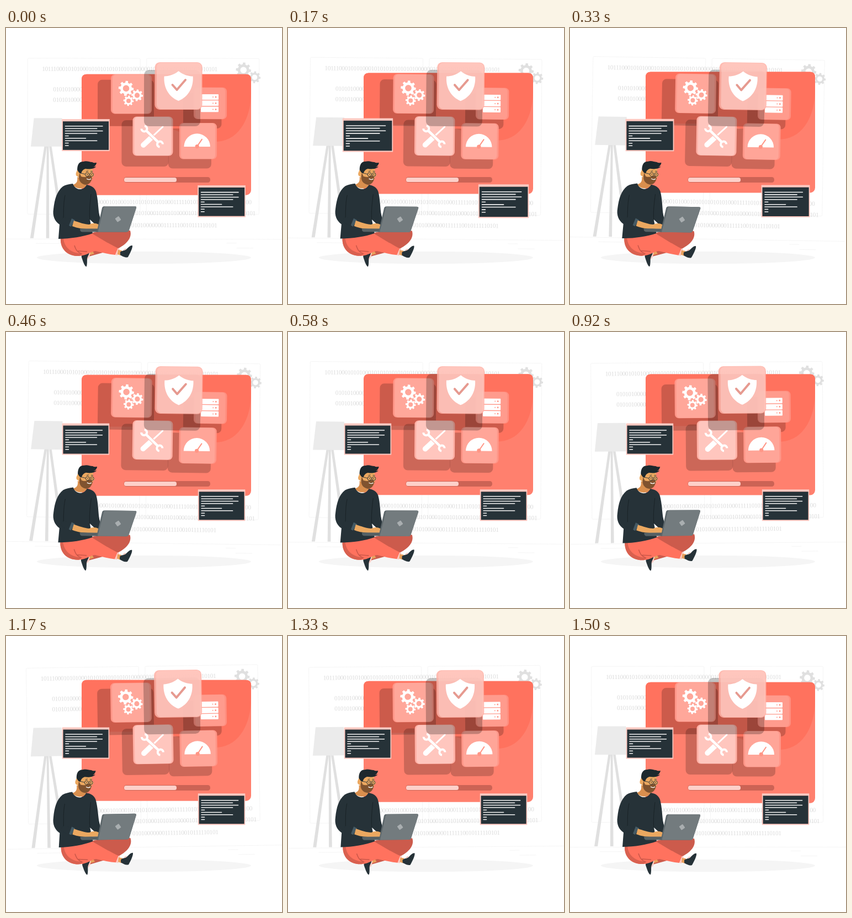
An HTML page for the animation above (1.54 s loop, 500x500 px).

```html
<!DOCTYPE html>
<html lang="en">
<head>
<meta charset="utf-8">
<title>System care</title>
<style>
html, body { margin: 0; width: 100%; height: 100%; overflow: hidden; background: #fff; }
svg { display: block; width: 100vw; height: 100vh; }
.code { font: 11.5px "Liberation Serif", serif; letter-spacing: -.44px; fill: #dcdcdc; }
</style>
</head>
<body>
<svg viewBox="0 0 500 500" xmlns="http://www.w3.org/2000/svg">
  <g id="back">
    <path d="M0 382.5H500M400 389.5H418M418 398.500H448M54 390.500H98" stroke="#f1f1f1" stroke-width=".7"/>
    <g fill="none" stroke="#f3f3f3" stroke-width=".8">
      <rect x="39" y="55" width="204" height="282.500" rx="2"/>
      <rect x="254.500" y="55" width="204" height="282.500" rx="2"/>
    </g>
    <g id="code" class="code"></g>
    <path id="backGears" fill="#e0e0e0" fill-rule="evenodd"/>
    <path d="M69.500 214L44 381H50L74 214ZM73.800 214L72.800 381H78.500L77.500 214ZM78 214L102 381H108L82.500 214Z" fill="#e0e0e0"/>
    <path d="M50.500 163.500H101.500L107 215H45Z" fill="#ebebeb"/>
  </g>
  <ellipse cx="250" cy="416" rx="194" ry="11.300" fill="#f5f5f5"/>

  <g id="panel">
    <rect x="137" y="84" width="307" height="219" rx="9" fill="#ff806e"/>
    <path d="M137 93Q137 84 146 84H435Q444 84 444 93V118C444 160 424 203 384 206C340 208 320 181 270 179C220 177 190 178 137 178Z" fill="#ff725e"/>
  </g>
  <rect x="213.500" y="270" width="156.500" height="10" rx="4.500" fill="#cc6355"/>
  <rect x="214" y="271" width="95" height="8" rx="3.500" fill="#ffd0c9"/>

  <g id="tiles">
    <g id="cards"></g>
    <path id="tileGears" fill="#fff" fill-rule="evenodd"/>
    <g id="servers"></g>
    <g fill="none" stroke="#fff">
      <path d="M284 179L267 195" stroke-width="3" stroke-linecap="round"/>
      <path d="M264.500 197.500L249 212" stroke-width="9.500" stroke-linecap="round"/>
      <path d="M253 185L277 208" stroke="#ffc4bc" stroke-width="7"/>
      <path d="M253 185L277 208" stroke-width="4.600"/>
      <path d="M251 177.500A5 5 0 1 1 245.500 182.500M278.500 215.500A5 5 0 1 1 284 210.500" stroke-width="4"/>
    </g>
    <path d="M322.500 215A23.700 23.700 0 0 1 370 215Z" fill="#fff"/>
    <path d="M346.500 214L355 201.500" stroke="#ff9686" stroke-width="2" stroke-linecap="round"/>
    <circle cx="346.300" cy="214.500" r="3.600" fill="#ff9686"/>
    <rect x="250" y="76" width="102" height="102" rx="9" fill="#000" opacity=".24"/>
    <rect x="269.500" y="62" width="86" height="86" rx="9" fill="#ffb1a6" opacity=".86"/>
    <rect x="273" y="63" width="81" height="84" rx="8" fill="#ffcdc6" opacity=".62"/>
    <path d="M312.500 78C304 85 294 87.500 286.500 87.500C285 108 295 125 312.500 132C330 125 340 108 338.500 87.500C331 87.500 321 85 312.500 78Z" fill="#fff"/>
    <path d="M301.500 103L309.500 112L325 94" fill="none" stroke="#e69a90" stroke-width="4" stroke-linecap="round" stroke-linejoin="round"/>
  </g>

  <g id="term1"></g>
  <g id="term2"></g>

  <g id="man">
    <path d="M138 377C165 366 200 363 225 367C229 380 219 391 204 399L150 414L132 412L150 396Z" fill="#cc5b4c"/>
    <path d="M148 406L157 404L160 409L150 412Z" fill="#e8a05c"/>
    <path d="M148 404L153 405L151 416L147 420Z" fill="#ffd0c9"/>
    <path d="M137 409C141 405 148 404 151 406C151 411 147 414 147 420C147 426 147 431 145.500 432.500C142 431 139 421 137 415Z" fill="#263238"/>
    <path d="M99 380C98 401 112 414 133 413C148 412 152 405 162 404C175 407 187 410 198 411L203 399C185 390 168 379 157 372Z" fill="#ff725e"/>
    <path d="M99 381C98 401 112 414 133 413L139 409C119 408 106 399 104 381Z" fill="#d9604f"/>
    <path d="M124 394C127 403 130 407 137 409M130 404L147 405" fill="none" stroke="#c95749" stroke-width="1.500"/>
    <path d="M157 373C175 369 199 366 222 366C218 381 201 388 184 389Z" fill="#cc5b4c"/>
    <path d="M198 411L203 398.500L206 400L202 412Z" fill="#ffc7be"/>
    <path d="M203 402L210 403L208 412L202 410Z" fill="#e8a05c"/>
    <path d="M207 406C210 403 214 404 218 401C222 397 226 393 229 394C230 398 225 408 221 415C217 417 210 413 207 411Z" fill="#263238"/>
    <path d="M212 402L217 399L218 401L214 403Z" fill="#ffc7be"/>

    <path d="M129 270L147 276L146 284C141 294 126 292 121 284C128 282 130 278 129 270Z" fill="#d98f4e"/>
    <path d="M121 282C125 294 140 296 146 284C153 285 160 288 163 296C167 310 167 329 169 338L173 354L164 358L152 347L157 372C140 378 117 382 95 382L97 356C88 350 84 340 86 328C88 310 92 296 103 287C108 284 114 283 121 282Z" fill="#263238"/>
    <path d="M107 303C103 320 105 336 104 345L119 351M154 301C152 319 150 333 152 347" fill="none" stroke="#1a2327" stroke-width="1"/>
    <path d="M98 349C104 355 111 359 118 360L123 348L105 343Z" fill="#263238"/>
    <path d="M118 360L114 358L119 345L125 348Z" fill="#455a64"/>
    <path d="M123 349C132 352 143 356 151 356C156 353 164 353 169 357L166 364H149C139 364 130 363 120 359Z" fill="#eba860"/>

    <path d="M131 255C126 259 126 268 132 271C133 280 139 284 146 283C153 281 156 274 157 269L160 267L157 262L156 252L143 249Z" fill="#eba860"/>
    <path d="M133 262L136 269C141 271 146 270 149 268C153 267 155 269 156 272C154 280 150 284 144 284C137 283 132 278 132 270Z" fill="#80532f"/>
    <path d="M146 273C149 275 152 275 154 273" fill="none" stroke="#fff" stroke-width="1.300"/>
    <path d="M129 257C129 248 132 242 140 242C146 240 151 243 156 243C159 245 162 244 164 244C163 249 160 252 156 252L163 251C159 256 150 256 144 255C140 256 137 259 136 264L132 262Z" fill="#1d282d"/>
    <ellipse cx="129.500" cy="264.500" rx="3" ry="4" fill="#eba860"/>
    <g fill="none" stroke="#263238" stroke-width=".9">
      <circle cx="147" cy="265.500" r="3.500"/><circle cx="155" cy="265.500" r="3.300"/>
      <path d="M143.500 265L136 263M145 260L149 259M153 259.500L157 260"/>
    </g>
    <path d="M146.500 265.500h1.500M154 265.500h1.500" stroke="#263238" stroke-width="1.400"/>

    <path d="M135 363.500H168V369.500H138Q134 369 134 364Z" fill="#566165"/>
    <path d="M178 323H233Q237 323 236 326L223 366Q222 369.500 218 369.500H164.500L174 326Q175 323 178 323Z" fill="#5d676b"/>
    <path d="M180 323H233Q237 323 236 326L223 366Q222 369.500 218 369.500H166.500L177 326Q178 323 180 323Z" fill="#737b7e"/>
    <rect x="199" y="342.300" width="8" height="8" rx="1" transform="rotate(-35 203 346.300)" fill="#a9aeb0"/>
  </g>
</svg>
<script>
const $ = id => document.getElementById(id);
const rect = (x, y, w, h, r, fill, opacity = 1) =>
  `<rect x="${x}" y="${y}" width="${w}" height="${h}" rx="${r}" fill="${fill}" opacity="${opacity}"/>`;

function gear(cx, cy, r, hole, teeth = 8) {
  const step = Math.PI * 2 / teeth, pts = [];
  for (let i = 0; i < teeth; i++) {
    [[-.3, .76], [-.2, 1], [.2, 1], [.3, .76]].forEach(([a, k]) => {
      const ang = (i + a) * step + .1;
      pts.push((cx + r * k * Math.cos(ang)).toFixed(2) + ' ' + (cy + r * k * Math.sin(ang)).toFixed(2));
    });
  }
  return `M${pts.join('L')}ZM${cx - hole} ${cy}a${hole} ${hole} 0 1 0 ${hole * 2} 0a${hole} ${hole} 0 1 0 ${-hole * 2} 0Z`;
}

$('backGears').setAttribute('d', gear(430, 76, 13.8, 5.8) + gear(450.3, 89, 10.8, 4.8));
$('tileGears').setAttribute('d', gear(217.5, 109.5, 13.8, 5.8) + gear(237.5, 122, 10.6, 4.6) + gear(222, 132, 9.4, 4));

const rows = [
  [65, 78, '10111000' + '1010' + '1000' + '10'.repeat(7) + '1000000' + '10'.repeat(10) + '101'],
  [85, 115, '010101000010'],
  [85, 134, '010101000010'],
  [165, 319, '0000101000' + '10'.repeat(6) + '10001111' + '10'.repeat(9) + '10100'],
  [229, 339, '1010100010101010000' + '10'.repeat(10) + '101'],
  [227, 361, '010100000001111110010111110101']
];
$('code').innerHTML = rows.map(([x, y, s]) => `<text x="${x}" y="${y}">${s}</text>`).join('');

// shadow box, then card box and its two tones
const cards = [
  [[166, 94, 102, 84], [190, 84, 74, 71.5], '#ff9789', '#ffa79a'],
  [[321, 118, 69.5, 64], [340, 107.5, 60, 57.5], '#ff8f80', '#ff9b8d'],
  [[294, 182, 78, 72.5], [314, 172, 68, 65.5], '#ff9688', '#ffa598'],
  [[209.5, 167, 85, 84], [229.5, 160.5, 73, 71], '#ffb0a5', '#ffc6be']
];
$('cards').innerHTML = cards.map(([s, [x, y, w, h], edge, face]) =>
  rect(...s, 8, '#000', .2) + rect(x, y, w, h, 7, edge) + rect(x + 3, y + .5, w - 6, h - 1, 6, face)).join('');

$('servers').innerHTML = [120, 131.2, 142.4].map(y =>
  rect(353, y, 32, 9.8, 1, '#fff') +
  `<circle cx="375" cy="${y + 4.9}" r="1" fill="#ff9b8d"/><circle cx="380" cy="${y + 4.9}" r="1.500" fill="#ff9b8d"/>`).join('');

const lengths = [68, 58, 68, 58, 7, 38, 58, 7, 7];
function terminal(x, y) {
  return rect(x, y, 85.5, 57, .5, '#ffc9c1') + rect(x + 1.8, y + 4, 82, 51, 0, '#263238') +
    lengths.map((w, i) => rect(x + 5.5, y + 11.8 + i * 4.33, w, 1.5, .7, '#f2f2f2')).join('');
}
$('term1').innerHTML = terminal(101.7, 165.5);
$('term2').innerHTML = terminal(347.8, 285.3);

// linear interpolation through [position, value] stops
function track(stops, p) {
  const i = stops.findIndex(s => s[0] >= p);
  if (i <= 0) return stops[0][1];
  const [a, u] = stops[i - 1], [b, v] = stops[i];
  return u + (v - u) * (p - a) / (b - a);
}
const sway = [[0, 0], [.25, 1], [.75, -1], [1, 0]];
const rise = [[0, 0], [.5, -9.7], [1, 0]];
const beat = [[0, 1], [.1, 1.08], [.3, 1], [.4, 1], [.5, 1.08], [.6, 1], [1, 1]];
const move = (id, t) => $(id).setAttribute('transform', t);
const zoom = (id, k, x, y) => move(id, `translate(${x} ${y}) scale(${k}) translate(${-x} ${-y})`);

const LOOP = 1540;
function draw(ms) {
  const p = (ms / LOOP + 1 / 60) % 1;
  const a = track(sway, p), k = track(beat, p);
  move('back', `rotate(${a} 250 228)`);
  move('tiles', `rotate(${a} 283 158)`);
  move('man', `rotate(${a} 157 337)`);
  move('panel', `translate(0 ${track(rise, p)})`);
  zoom('term1', k, 144.4, 194);
  zoom('term2', k, 390.5, 313.8);
}

const start = performance.now();
function frame() {
  draw(performance.now() - start);
  requestAnimationFrame(frame);
}
draw(0);
requestAnimationFrame(frame);
</script>
</body>
</html>
```
